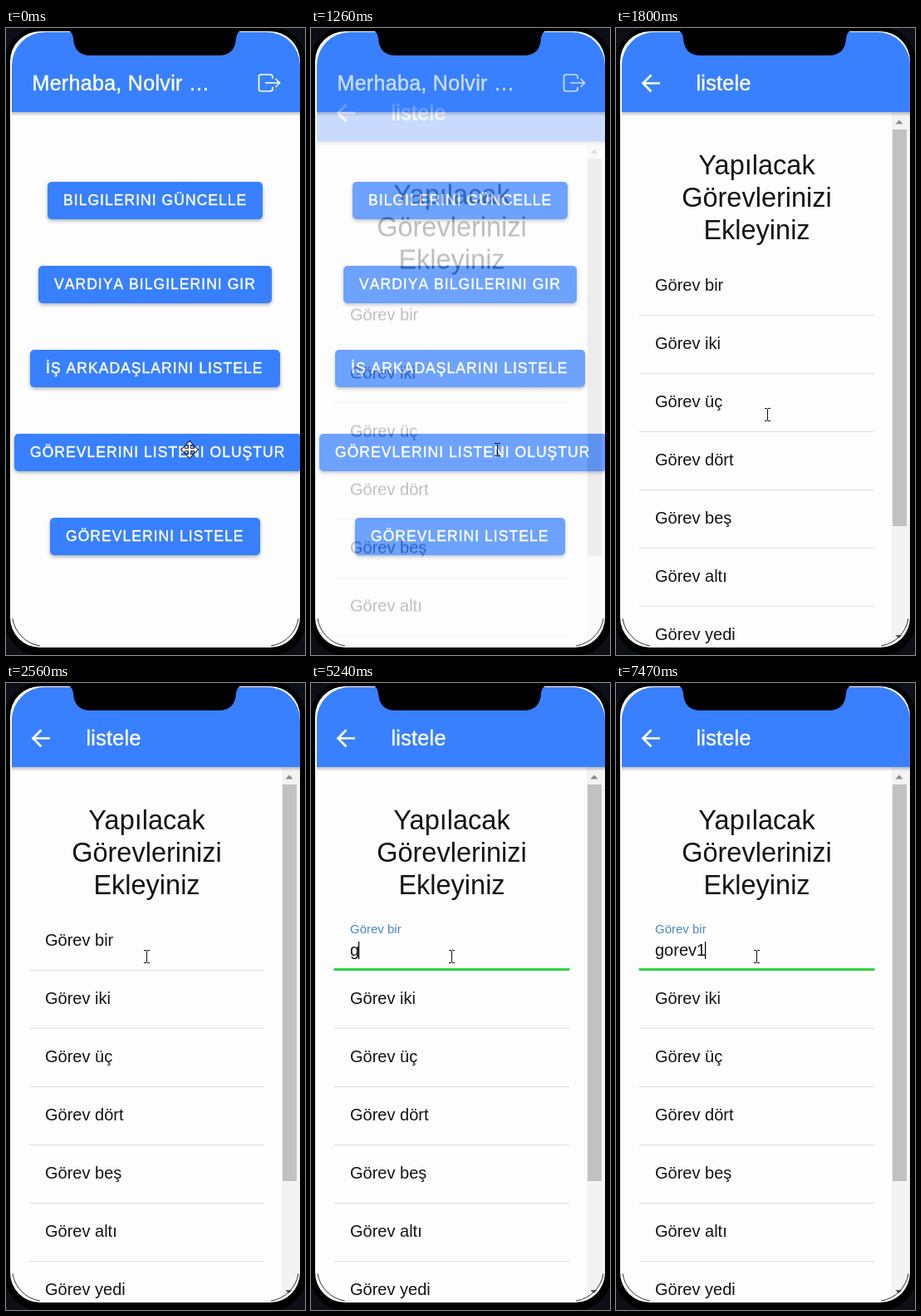
An HTML page with a canvas for the animation above (8 s loop, 360 by 754 pixels).

```html
<!DOCTYPE html>
<html lang="tr">
<head>
<meta charset="utf-8">
<title>Görev listesi</title>
<style>
  html, body { margin: 0; width: 100%; height: 100%; overflow: hidden; background: #000; }
  canvas { display: block; width: 360px; height: 754px; }
</style>
</head>
<body>
<canvas id="stage"></canvas>
<script>
const W = 360, H = 754, LOOP = 8000;
const BLUE = '#3880ff', PAPER = '#fdfdfe', INK = '#141414';
const FONT = '"Liberation Sans", Arial, sans-serif';
const dpr = window.devicePixelRatio || 1;

function setup(canvas) {
  canvas.width = W * dpr;
  canvas.height = H * dpr;
  const c = canvas.getContext('2d');
  c.scale(dpr, dpr);
  return c;
}
const stage = setup(document.getElementById('stage'));
const layerCanvas = document.createElement('canvas');
const layer = setup(layerCanvas);

const clamp = v => Math.max(0, Math.min(1, v));
const mix = (a, b, k) => a + (b - a) * k;
const span = (t, from, to) => clamp((t - from) / (to - from));
const smooth = k => k * k * (3 - 2 * k);

function bezier(x, x1, y1, x2, y2) {
  const at = (s, a, b) => 3 * a * s * (1 - s) ** 2 + 3 * b * s * s * (1 - s) + s ** 3;
  let lo = 0, hi = 1;
  for (let i = 0; i < 24; i++) {
    const mid = (lo + hi) / 2;
    if (at(mid, x1, x2) < x) lo = mid; else hi = mid;
  }
  return at(lo, y1, y2);
}

function box(c, x, y, w, h, r, color) {
  c.beginPath();
  c.roundRect(x, y, w, h, r);
  c.fillStyle = color;
  c.fill();
}

function rect(c, x, y, w, h, color) {
  c.fillStyle = color;
  c.fillRect(x, y, w, h);
}

function text(c, str, x, y, size, color, align = 'left') {
  c.font = `${size}px ${FONT}`;
  c.letterSpacing = '0px';
  c.fontKerning = 'auto';
  c.textAlign = align;
  c.fillStyle = color;
  c.fillText(str, x, y);
}

// White medium-weight text with tracking
function label(c, str, x, y, size, spacing) {
  c.font = `${size}px ${FONT}`;
  c.letterSpacing = spacing + 'px';
  c.fontKerning = 'none';
  c.textAlign = 'left';
  c.fillStyle = c.strokeStyle = '#fff';
  c.lineWidth = 0.45;
  c.fillText(str, x, y);
  c.strokeText(str, x, y);
}

function stroke(c, path, color, width) {
  c.strokeStyle = color;
  c.lineWidth = width;
  c.stroke(new Path2D(path));
}

function header(c, title, x) {
  const shade = c.createLinearGradient(0, 100, 0, 106);
  shade.addColorStop(0, 'rgba(0,0,0,.3)');
  shade.addColorStop(1, 'rgba(0,0,0,0)');
  rect(c, 0, 100, W, 6, shade);
  rect(c, 0, 0, W, 101, BLUE);
  label(c, title, x, 75, 25, 0.3125);
}

// Home page
const buttons = [
  ['BILGILERINI GÜNCELLE', 50, 259],
  ['VARDIYA BILGILERINI GIR', 39, 281],
  ['İŞ ARKADAŞLARINI LISTELE', 29, 301],
  ['GÖREVLERINI LISTENI OLUŞTUR', 10, 346],
  ['GÖREVLERINI LISTELE', 53, 253]
];

function home(c) {
  rect(c, 0, 0, W, H, PAPER);
  buttons.forEach(([name, x, w], i) => {
    const y = 185 + 101 * i;
    c.save();
    c.shadowColor = 'rgba(0,0,0,.3)';
    c.shadowBlur = 4 * dpr;
    c.shadowOffsetY = 2 * dpr;
    box(c, x, y, w, 45, 5, BLUE);
    c.restore();
    label(c, name, x + 19, y + 28, 17.5, 1.05);
  });
  header(c, 'Merhaba, Nolvir …', 31.5);
  stroke(c, 'M321 61V59Q321 56 318 56H307Q304.5 56 304.5 59V73Q304.5 76 307 76H318Q321 76 321 73V71', '#fff', 1.7);
  stroke(c, 'M312 66H329M324.5 61L329.5 66L324.5 71', '#fff', 1.7);
}

// Task page
const keys = [[5200, 'g'], [6130, 'o'], [6340, 'r'], [6500, 'e'], [7010, 'v'], [7470, '1']];
const caretOn = [[2650, 3150], [3690, 4280], [4780, 5750], [6130, LOOP]];
const FOCUS = 2650;

function firstTask(c, t) {
  const k = smooth(span(t, FOCUS, FOCUS + 150));
  const tone = [[20, 74], [20, 134], [20, 205]].map(([a, b]) => Math.round(mix(a, b, k)));
  text(c, 'Görev bir', 47, mix(316, 301, k), mix(20, 15, k), `rgb(${tone})`);
  if (t < FOCUS) return;

  const grow = smooth(span(t, FOCUS, FOCUS + 200));
  rect(c, 169.5 - 142 * grow, 343, 284 * grow, 3, '#37d045');
  const typed = keys.filter(([at]) => t >= at).map(([, ch]) => ch).join('');
  text(c, typed, 47, 328, 20, INK);
  if (caretOn.some(([a, b]) => t >= a && t < b)) {
    rect(c, Math.round(47 + c.measureText(typed).width) - (typed ? 1 : 0), 311, 1.2, 21, '#000');
  }
}

function tasks(c, t) {
  rect(c, 0, 0, W, H, PAPER);
  ['Yapılacak', 'Görevlerinizi', 'Ekleyiniz'].forEach((line, i) =>
    text(c, line, 169.5, 176 + 39 * i, 32.5, INK, 'center'));

  for (let i = 0; i < 6; i++) rect(c, 28, 345 + 70 * i, 283, 1, '#dedede');
  ['iki', 'üç', 'dört', 'beş', 'altı', 'yedi'].forEach((n, i) =>
    text(c, 'Görev ' + n, 47, 386 + 70 * i, 20, INK));
  firstTask(c, t);

  rect(c, 332, 101, 22, 643, '#f3f3f3');
  rect(c, 333, 122, 17, 477, '#c1c1c1');
  c.fillStyle = '#8a8a8a';
  c.fill(new Path2D('M336.5 115.5L341 110.5L345.5 115.5Z'));
  c.fillStyle = '#555';
  c.fill(new Path2D('M336.5 730L345.5 730L341 735Z'));

  header(c, 'listele', 96.5);
  stroke(c, 'M53 66.5H33M42.5 56.5L32.5 66.5L42.5 76.5', '#fff', 2.7);
}

// Device
function bezel(c) {
  rect(c, 0, 0, W, H, '#0c0f15');
  box(c, -2, -2, 364, 758, 46, '#000');
  box(c, 5, 4, 349, 741, 36, '#fdfdfb');
}

function screenClip(c) {
  c.beginPath();
  c.roundRect(7, 5, 347, 739, 40);
  c.clip();
}

function rims(c) {
  c.fillStyle = '#000';
  c.fill(new Path2D('M74 3Q80 4 81 12Q82 33 102 33H256Q276 33 277 12Q278 4 284 3Z'));
  c.strokeStyle = '#333';
  c.lineWidth = 1;
  for (const [x, from] of [[47, 0.55], [313, 0.05]]) {
    c.beginPath();
    c.arc(x, 704, 39.5, from * Math.PI, (from + 0.4) * Math.PI);
    c.stroke();
  }
}

// Pointer
const route = [[0, 221, 507], [130, 221, 507], [800, 224, 507], [1450, 224, 507],
  [1800, 182, 465], [2010, 176, 425], [2550, 169, 329], [LOOP, 169, 329]];

function pointerAt(t) {
  const i = route.findIndex(p => t < p[0]);
  const [t0, x0, y0] = route[i - 1], [t1, x1, y1] = route[i];
  const k = span(t, t0, t1);
  return [Math.round(mix(x0, x1, k)), Math.round(mix(y0, y1, k))];
}

function pointer(c, t) {
  const [x, y] = pointerAt(t);
  c.save();
  c.translate(x, y);
  if (t < 1220) {
    const cross = new Path2D();
    const arm = new Path2D('M-1.2 0V-6H-3.6L0 -10L3.6 -6H1.2V0Z');
    for (let i = 0; i < 4; i++) cross.addPath(arm, new DOMMatrix().rotate(90 * i));
    c.strokeStyle = '#000';
    c.lineWidth = 1.6;
    c.stroke(cross);
    c.fillStyle = '#fff';
    c.fill(cross);
  } else {
    stroke(c, 'M-3 -7.5H0M1 -7.5H4M.5 -7V7M-3 7.5H0M1 7.5H4', '#111', 1);
  }
  c.restore();
}

function draw(t) {
  const c = stage;
  bezel(c);
  c.save();
  screenClip(c);
  const enter = bezier(span(t, 1247, 1497), 0.36, 0.66, 0.04, 1);
  if (enter < 1) home(c);
  if (enter > 0) {
    tasks(layer, t);
    c.globalAlpha = Math.pow(enter, 0.6);
    c.drawImage(layerCanvas, 0, 40 * (1 - enter), W, H);
    c.globalAlpha = 1;
  }
  c.restore();
  rims(c);
  pointer(c, t);
}

function tick() {
  draw(performance.now() % LOOP);
  requestAnimationFrame(tick);
}
tick();
</script>
</body>
</html>
```
